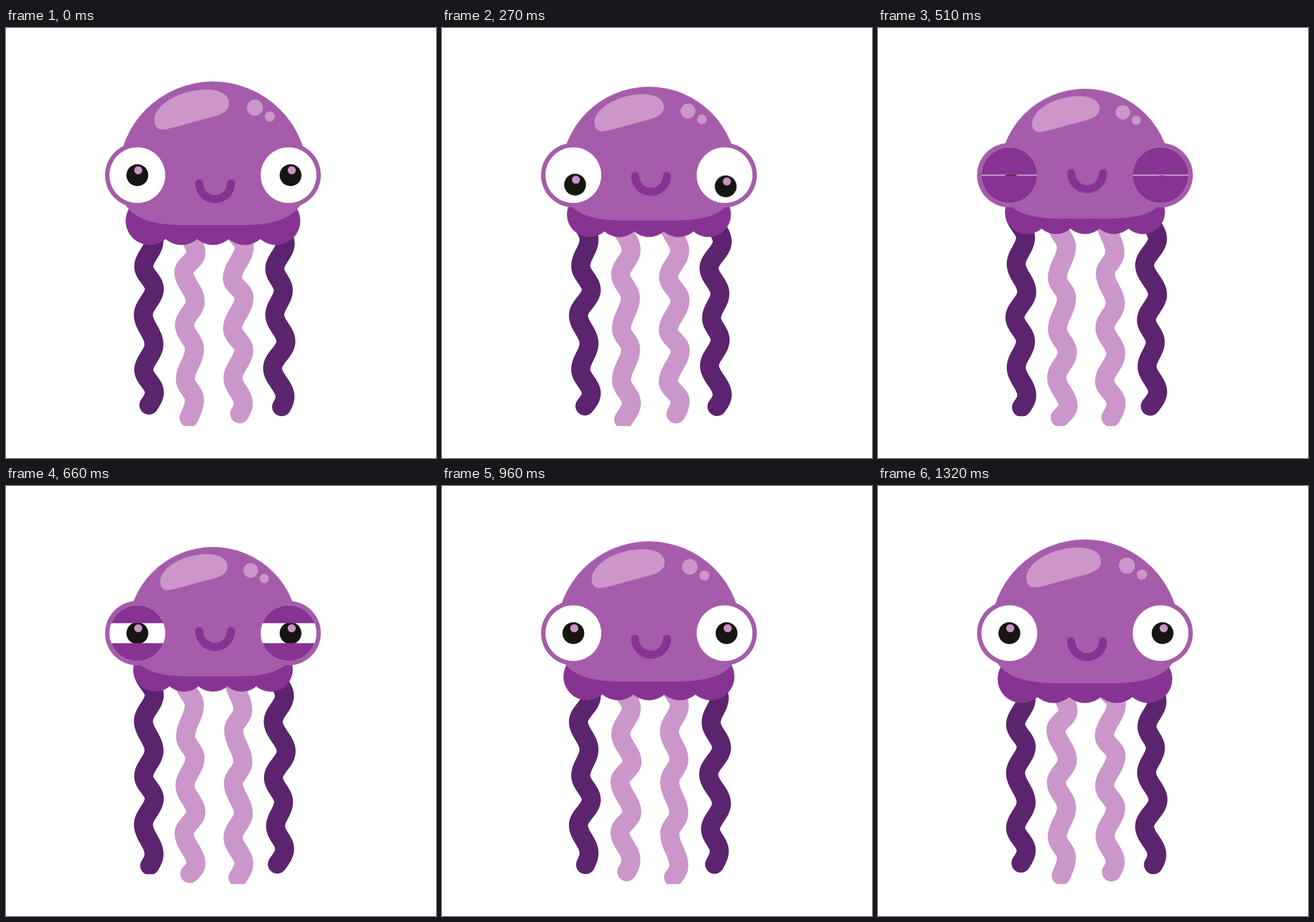
These frames come from a looping animation (748 px wide and 748 px high, 1.35 s). An HTML page:

```html
<!DOCTYPE html>
<html lang="en">
<head>
<meta charset="utf-8">
<title>Jellyfish</title>
<style>
  html, body { margin: 0; width: 100%; height: 100%; overflow: hidden; background: #fff; }
  svg { display: block; width: 100%; height: 100%; }
  .body, .skirt, .smile, .lid, .pupil { animation: 1350ms ease infinite; }
  .body { animation-name: squash; --s: .9; transform-origin: 360px 223px; }
  .skirt { animation-name: squash; --s: .9135; transform-origin: 360px 150px; }
  .smile { animation-name: rise; }
  .lid { animation-name: blink; }
  .lid.top { --y: 48.8px; }
  .lid.low { --y: -48.8px; }
  .pupil { animation-name: look; }
  .pupil.l { --look: translate(3px, 16.5px); }
  .pupil.r { --look: translate(-1.5px, 19.5px); }
  @keyframes squash {
    0%, 98%, 100% { transform: scale(1); }
    48.5% { transform: scale(var(--s)); }
  }
  @keyframes rise {
    0%, 98%, 100% { transform: none; }
    48.5% { transform: translateY(-18px); }
  }
  @keyframes blink {
    0%, 28.3%, 59%, 100% { transform: translateY(0); }
    40%, 46% { transform: translateY(var(--y)); }
  }
  @keyframes look {
    0%, 2%, 46%, 100% { transform: translate(0, 0); }
    9%, 40% { transform: var(--look); }
  }
  .mid { fill: #a55caa; }
  .deep { fill: #873393; }
  .pale { fill: #cb96c9; }
  .arm { fill: none; stroke-width: 33; stroke-linecap: round; stroke-linejoin: round; }
</style>
</head>
<body>
<svg viewBox="0 0 748 748">
  <defs>
    <clipPath id="darkCut"><path d="M0 0H748V675.3H0z"/></clipPath>
    <clipPath id="paleCut"><path d="M0 0H748V692.5H0z"/></clipPath>
    <clipPath id="eyeL"><circle cx="228.5" cy="256" r="48.5"/></clipPath>
    <clipPath id="eyeR"><circle cx="491.5" cy="256" r="48.5"/></clipPath>
  </defs>

  <g id="dark" clip-path="url(#darkCut)" stroke="#5c246e"></g>
  <g id="pale" clip-path="url(#paleCut)" stroke="#cb96c9"></g>

  <g class="skirt deep">
    <circle cx="250" cy="335.5" r="42"/>
    <circle cx="305" cy="335.5" r="42"/>
    <circle cx="360" cy="335.5" r="42"/>
    <circle cx="415" cy="335.5" r="42"/>
    <circle cx="470" cy="335.5" r="42"/>
  </g>

  <g class="body">
    <path class="mid" d="M195 258.500A165 165.500 0 0 1 525 258.500C525 318 490 343 410 343H310C230 343 195 318 195 258.500z"/>
    <path class="pale" d="M272 176.500C262 176.500 258 169 258 160C258 134 302 107 349 107C374 107 388 117 388 131C388 145 374 151 358 155C330 162 300 171 283 175C278 176 276 176.500 272 176.500z"/>
    <circle class="pale" cx="433" cy="138.500" r="14"/>
    <circle class="pale" cx="459" cy="154" r="9"/>
  </g>

  <path class="smile" d="M336 270a27.700 27.700 0 0 0 55.400 0" fill="none" stroke="#873393" stroke-width="14" stroke-linecap="round"/>

  <circle class="mid" cx="228.300" cy="256" r="56"/>
  <circle class="mid" cx="491.700" cy="256" r="56"/>

  <g clip-path="url(#eyeL)">
    <path fill="#fff" d="M170 200h115v115h-115z"/>
    <g class="pupil l">
      <circle cx="228.500" cy="256" r="19" fill="#181411"/>
      <circle cx="230" cy="247.500" r="7" fill="#cc92c8"/>
    </g>
    <path class="lid top deep" d="M170 140h115v67.500h-115z"/>
    <path class="lid low deep" d="M170 304.500h115v67.500h-115z"/>
  </g>
  <g clip-path="url(#eyeR)">
    <path fill="#fff" d="M435 200h115v115h-115z"/>
    <g class="pupil r">
      <circle cx="495" cy="256" r="19" fill="#181411"/>
      <circle cx="497" cy="247.500" r="7" fill="#cc92c8"/>
    </g>
    <path class="lid top deep" d="M435 140h115v67.500h-115z"/>
    <path class="lid low deep" d="M435 304.500h115v67.500h-115z"/>
  </g>
</svg>

<script>
const LOOP = 1350;

// dx, dy: [size, peak time, delay per bend, left/right skew]
// tip: [middle, size, peak time]
const arms = [
  { layer: 'dark', x: 248.5, y: 367, bend: 45, amp: 9.2,
    dx: [2, -206, 337.5, -169], dy: [3.5, -118, 337.5, 144], tip: [658.2, 2.2, 675] },
  { layer: 'pale', x: 320, y: 386, bend: 44.3, amp: 9.1,
    dx: [1.5, 0, 556, -80], dy: [6, 20, 558, -80], tip: [676, 5, 240] },
  { layer: 'pale', x: 404, y: 385, bend: 45, amp: 9.1,
    dx: [1.3, 0, 740, 0], dy: [6, 600, 745, -80], tip: [676, 6, 800] },
  { layer: 'dark', x: 475.6, y: 370, bend: 44.4, amp: 9.3,
    dx: [2.6, 245, 905, 30], dy: [5, -60, 225, 70], tip: [658.3, .5, 0] }
];

const wave = (t, peak) => Math.cos(2 * Math.PI * (t - peak) / LOOP);
const mix = (a, b, f) => a + (b - a) * f;

// Even bends lie to the right, odd ones to the left.
function bendAt(a, n, t) {
  const side = n % 2 ? -1 : 1;
  const sway = ([size, peak, delay, skew]) => size * wave(t, peak + delay * n + skew * side);
  return [a.x + a.amp * side + sway(a.dx), a.y + a.bend * n + sway(a.dy)];
}

function armPath(a, t) {
  const end = a.tip[0] + a.tip[1] * wave(t, a.tip[2]);
  const points = [];
  for (let n = -1; n < 8; n++) {
    const [x0, y0] = bendAt(a, n, t);
    const [x1, y1] = bendAt(a, n + 1, t);
    const stop = Math.min(1, (end - y0) / (y1 - y0));
    for (let i = 0; i <= 16; i++) {
      const f = stop * i / 16;
      points.push([mix(x0, x1, (1 - Math.cos(Math.PI * f)) / 2), mix(y0, y1, f)]);
    }
    if (stop < 1) break;
  }
  return 'M' + points.map(p => p[0].toFixed(2) + ' ' + p[1].toFixed(2)).join('L');
}

for (const a of arms) {
  a.el = document.createElementNS('http://www.w3.org/2000/svg', 'path');
  a.el.setAttribute('class', 'arm');
  document.getElementById(a.layer).append(a.el);
}

function draw(t) {
  for (const a of arms) a.el.setAttribute('d', armPath(a, t));
}

let start;
function tick(now) {
  start ??= now;
  draw((now - start) % LOOP);
  requestAnimationFrame(tick);
}
draw(0);
requestAnimationFrame(tick);
</script>
</body>
</html>
```
